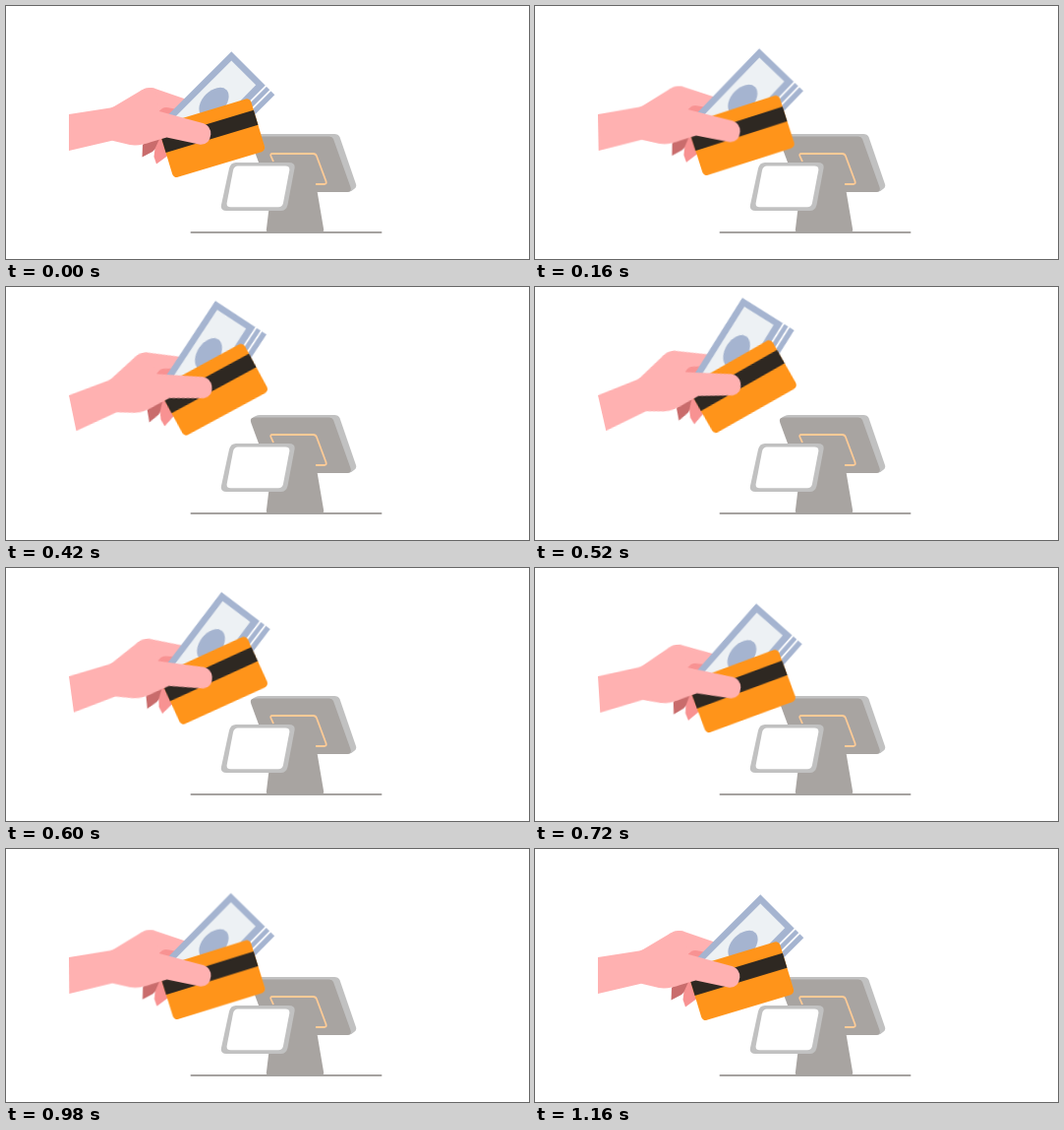
Write an HTML page that moves like this. It is 532x257 px and loops after 2400 ms.

```html
<!DOCTYPE html>
<html lang="en">
<head>
<meta charset="utf-8">
<title>Payment at the till</title>
<style>
  html, body { margin: 0; width: 100%; height: 100%; overflow: hidden; background: #fff; }
  svg { display: block; width: 532px; height: 257px; }
  #arm { transform-origin: 64px 110px; }
  .skin { fill: #ffb1b1; }
  .mid { fill: #f89292; }
  .deep { fill: #c96c6c; }
  .note { fill: #a5b4d0; }
  .paper { fill: #edf1f4; }
  .metal { fill: #a8a4a1; }
  .rim { fill: #c1c1c1; }
</style>
</head>
<body>
<svg viewBox="0 0 532 257">
  <g id="till">
    <path class="metal" d="M270 185H316L323 226Q324 230 320 230H268Q264 230 265 226Z"/>
    <path d="M188.500 229.900H381.500" stroke="#a5a2a0" stroke-width="2" stroke-linecap="round"/>
    <path class="rim" d="M249 136Q249 134 252 132Q255 130 258 130H334Q338 130 339.500 133L356 181Q357 184 354 186Q351 189 348 189H300Z"/>
    <path class="metal" d="M253 132.500H329Q332 132.500 333 135L350.500 184Q352 189 347 189H272Q268 189 267 186L249.300 138Q247.500 132.500 253 132.500Z"/>
    <path d="M272 158L269.500 152.500Q268.500 150 271 150H312.500Q315 150 316 152.500L325.500 178Q326.500 181 323.500 181H315"
          fill="none" stroke="#ffcb96" stroke-width="1.800"/>
    <path class="rim" d="M234 159H288Q294.500 159 293.500 165L286.500 202Q285 208 279.500 208H224Q218 208 219 202L227 165Q228.500 159 234 159Z"/>
    <path fill="#fff" d="M236 162.500H284Q289 162.500 288.300 167L282 200Q281 204.300 277 204.300H228.500Q224 204.300 224.700 200L231 167Q232 162.500 236 162.500Z"/>
  </g>

  <g id="arm">
    <path class="deep" d="M139 141L146 134L160 133L155 142L149 148L138.500 153.500Z"/>
    <path class="mid" d="M157 133L151.500 145L150.500 153L153 160.500L166 151L164 133Z"/>
    <path class="skin" d="M125 110L137 86Q144 81.500 152 84L181 94L190 98L175 118Z"/>
    <path class="mid" d="M155 107.500L159 104Q161.500 102.500 165 103.200L180 106L175 116Z"/>

    <path class="note" d="M229.300 46.200L273.300 90.200L238 125.500L170 125L163 112.500Z"/>
    <path class="paper" d="M229.300 55.500L254.200 80.300L224 111L172 118L172 112.800Z"/>
    <ellipse class="note" cx="211.500" cy="98" rx="18" ry="11.500" transform="rotate(-45 211.500 98)"/>
    <path d="M264.800 80.800L240 105.600M269.300 85.300L245 109.600" stroke="#fff" stroke-width="1.800"/>

    <g transform="translate(209.300 134.200) rotate(-16.800)">
      <rect x="-49" y="-28" width="98" height="56" rx="4.500" fill="#ff941a"/>
      <rect x="-49" y="-15" width="98" height="15.700" fill="#2e2822"/>
    </g>

    <path class="skin" d="M64 110L106 103.500Q108.500 103 110.500 101.800L137 86Q144 81.500 152 84L156 107L201 119.200Q208.500 121.800 208.300 130.500Q207 141.200 197.500 140.700L163.500 133.500L148 138Q136 142.500 126 141L108 136.700L64 147Z"/>
  </g>
</svg>
<script>
  const turn = deg => `rotate(${deg}deg)`;
  const steps = [
    { at: 0,    deg: 0,     ease: 'cubic-bezier(.76, 0, .8, 1)' },
    { at: 480,  deg: -13.5, ease: 'cubic-bezier(.19, 0, 0, 1)' },
    { at: 1200, deg: 0,     ease: 'linear' },
    { at: 2400, deg: 0,     ease: 'linear' }
  ];
  const loop = 2400;

  document.getElementById('arm').animate(
    steps.map(s => ({ offset: s.at / loop, transform: turn(s.deg), easing: s.ease })),
    { duration: loop, iterations: Infinity }
  );
</script>
</body>
</html>
```
